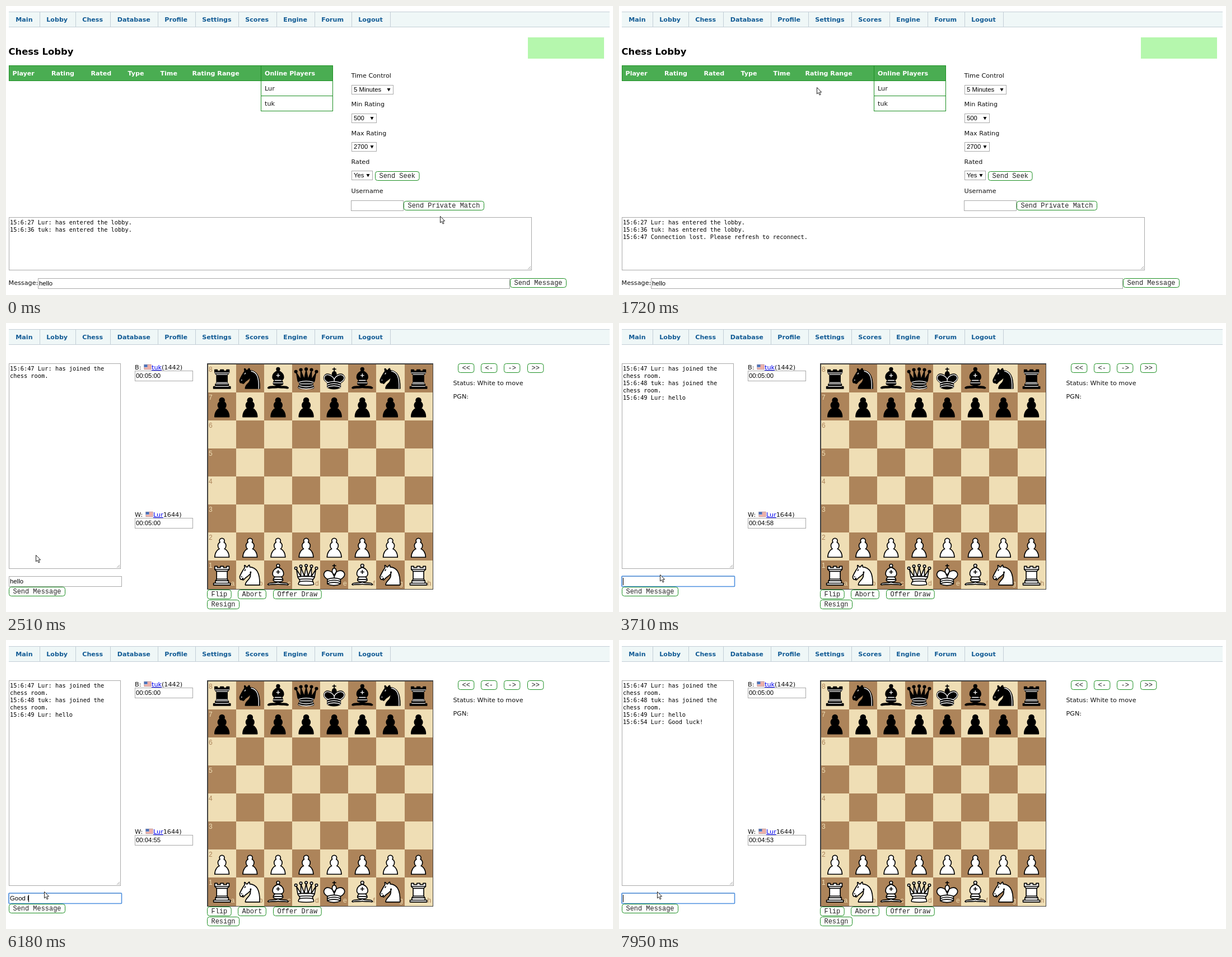
Recreate the animation shown at these times as an HTML page with a canvas. Size 1084 by 516 pixels, loop 8000 ms.

```html
<!DOCTYPE html>
<html lang="en">
<head>
<meta charset="utf-8">
<title>Chess Lobby</title>
<style>
html, body { margin: 0; width: 100%; height: 100%; overflow: hidden; background: #fff; }
canvas { display: block; }
</style>
</head>
<body>
<canvas id="stage" width="1084" height="516"></canvas>
<script>
const ctx = document.getElementById('stage').getContext('2d');
const LOOP = 8000;
const UI = '11.2px "DejaVu Sans", sans-serif';
const BOLD = 'bold 11.1px "DejaVu Sans", sans-serif';
const TITLE = 'bold 16.4px "DejaVu Sans", sans-serif';
const FIELD = '11.35px "Liberation Sans", sans-serif';
const COORD = '12px "Liberation Sans", sans-serif';
const CHAT = '10.35px "DejaVu Sans Mono", monospace';
const BUTTON = '11.95px "Liberation Mono", monospace';
const LIGHT = '#efdeb5', DARK = '#ad845a', GREEN = '#1c8f22';
const HOST = 'Lur', GUEST = 'tuk';

// ---- timeline: each entry is [time, value]
const CHESS_PAGE = 1780, GAME_DATA = 2010, FOCUS = 2990;
const typed = [[0, 'hello'], [3710, ''], [5150, 'G'], [5280, 'Go'], [5410, 'Goo'], [5540, 'Good'],
  [5990, 'Good '], [6180, 'Good l'], [6310, 'Good lu'], [6370, 'Good luc'], [6430, 'Good luck'],
  [7220, 'Good luck!'], [7950, '']];
const clockTicks = [3770, 4750, 5730, 6760, 7750];
const lobbyChat = [[0, `15:6:27 ${HOST}: has entered the lobby.`], [0, `15:6:36 ${GUEST}: has entered the lobby.`],
  [1720, '15:6:47 Connection lost. Please refresh to reconnect.']];
const gameChat = [[GAME_DATA, `15:6:47 ${HOST}: has joined the`], [GAME_DATA, 'chess room.'],
  [2630, `15:6:48 ${GUEST}: has joined the`], [2630, 'chess room.'],
  [3710, `15:6:49 ${HOST}: hello`], [7950, `15:6:54 ${HOST}: Good luck!`]];
const pointer = [[0, 775, 375], [399, 775, 375], [400, 772, 372], [740, 772, 372], [1260, 358, 116],
  [1460, 353, 144], [1780, 353, 145], [1900, 353, 145], [2510, 53, 414], [2870, 64, 460],
  [3130, 64, 460], [3250, 73, 449], [3830, 73, 449], [3960, 68, 449], [LOOP, 68, 449]];

const current = (list, t) => list.filter(e => e[0] <= t).pop();

function pointerAt(t) {
  const i = pointer.findIndex(p => p[0] > t), [t0, x0, y0] = pointer[i - 1], [t1, x1, y1] = pointer[i];
  const k = (t - t0) / (t1 - t0), e = k * k * (3 - 2 * k);
  return [x0 + (x1 - x0) * e, y0 + (y1 - y0) * e];
}

// ---- drawing helpers
function text(str, x, y, font = UI, color = '#111', align = 'left') {
  ctx.font = font;
  ctx.fillStyle = color;
  ctx.textAlign = align;
  ctx.fillText(str, x, y);
  return x + ctx.measureText(str).width;
}

function fill(x, y, w, h, color) {
  ctx.fillStyle = color;
  ctx.fillRect(x, y, w, h);
}

function frame(x, y, w, h, color = '#a9a9a9', width = 1) {
  ctx.strokeStyle = color;
  ctx.lineWidth = width;
  ctx.strokeRect(x + .5, y + .5, w - 1, h - 1);
}

function button(x, y, label) {
  ctx.beginPath();
  ctx.roundRect(x + .5, y + .5, label.length * 7.17 + 14, 16, 4);
  ctx.strokeStyle = GREEN;
  ctx.lineWidth = 1;
  ctx.stroke();
  text(label, x + 7.5, y + 12, BUTTON, '#222');
}

function field(x, y, w, value = '') {
  frame(x, y, w, 19);
  text(value, x + 2, y + 13, FIELD, '#000');
}

function select(x, y, w, value) {
  frame(x, y, w, 17);
  text(value, x + 4, y + 12.3, FIELD, '#000');
  ctx.fillStyle = '#000';
  ctx.fill(new Path2D(`M${x + w - 11.5} ${y + 6}h6l-3 5.5z`));
}

function chatBox(x, y, w, h, lines, t) {
  frame(x, y, w, h);
  lines.filter(l => l[0] <= t).forEach((l, i) => text(l[1], x + 2, y + 13 + i * 13, CHAT, '#000'));
  ctx.strokeStyle = '#888';
  ctx.lineWidth = .8;
  ctx.stroke(new Path2D(`M${x + w - 7} ${y + h - 2}l5-5m-2 5l2-2`));
}

function nav(y) {
  fill(5, y, 1073, 28, '#eff7f7');
  fill(5, y, 1073, 1, '#c3ced6');
  fill(5, y + 27, 1073, 1, '#c3ced6');
  const items = { Main: 18, Lobby: 73, Chess: 137, Database: 199.5, Profile: 284, Settings: 351,
    Scores: 428, Engine: 496, Forum: 564, Logout: 630 };
  for (const [name, x] of Object.entries(items)) text(name, x - .7, y + 18, BOLD, '#105a94');
  for (const x of [60, 124, 186, 271, 338, 415, 483, 551, 617, 686]) fill(x, y + 1, 1, 26, '#c3ced6');
}

// ---- lobby
function lobby(t) {
  nav(10);
  text('Chess Lobby', 4.5, 87, TITLE, '#000');
  fill(932, 56, 136, 38, '#b5f7ad');

  fill(5, 106, 579, 28, '#4aad52');
  frame(5, 106, 579, 28, GREEN);
  const columns = [12, 81.5, 152, 218, 276, 333, 462.5];
  ['Player', 'Rating', 'Rated', 'Type', 'Time', 'Rating Range', 'Online Players']
    .forEach((name, i) => text(name, columns[i] - .5, 124, BOLD, '#fff'));
  frame(455, 106, 129, 28, GREEN);
  [HOST, GUEST].forEach((name, i) => {
    frame(455, 133 + 27 * i, 129, 28, GREEN);
    text(name, 462, 151 + 27 * i);
  });
  if (t >= 1130 && t < 1660) {
    frame(5, 133, 451, 28, GREEN);
    [GUEST, '1442', 'Yes', 'blitz', '5', '500-2700'].forEach((v, i) => text(v, columns[i], 151));
  }

  ['Time Control', 'Min Rating', 'Max Rating', 'Rated', 'Username']
    .forEach((label, i) => text(label, 616.5, 128 + 51.4 * i));
  select(617, 141, 75, '5 Minutes');
  select(617, 192, 45, '500');
  select(617, 243, 45, '2700');
  select(617, 294, 38, 'Yes');
  button(659, 295, 'Send Seek');
  field(616, 347, 94);
  button(710, 348, 'Send Private Match');

  chatBox(5, 377, 934, 95, lobbyChat, t);
  text('Message:', 4.5, 498);
  field(57, 486, 843, 'hello');
  button(900, 486, 'Send Message');
}

// ---- chess pieces: shapes in a 45 x 45 cell; "lines" are thin inner strokes
const circle = (x, y, r) => `M${x - r} ${y}a${r} ${r} 0 1 1 ${2 * r} 0a${r} ${r} 0 1 1 ${-2 * r} 0z`;
const crown = r => [[6, 12], [14, 9], [22.5, 8], [31, 9], [39, 12]].map(([x, y]) => circle(x, y, r)).join('');
const pieces = {
  P: { body: 'M22.5 9c-2.21 0-4 1.79-4 4 0 .89.29 1.71.78 2.38C17.33 16.5 16 18.59 16 21c0 2.03.94 3.84 2.41 5.03-3 1.06-7.41 5.55-7.41 13.47h23c0-7.92-4.41-12.41-7.41-13.47 1.47-1.19 2.41-3 2.41-5.03 0-2.41-1.33-4.5-3.28-5.62.49-.67.78-1.49.78-2.38 0-2.21-1.79-4-4-4z', lines: '' },
  R: { body: 'M9 39h27v-3H9zM12 36v-4h21v4zM12.5 32l1.5-2.5h17l1.5 2.5zM14 29.5V17h17v12.5zM14 17l-3-3V9h4v2h5V9h5v2h5V9h4v5l-3 3z',
    lines: 'M11 14h23', darkLines: 'M12 35.5h21M13 31.5h19M14 29.5h17M14 16.5h17M11 14h23' },
  N: { body: 'M22 10c10.5 1 16.5 8 16 29H15c0-9 10-6.5 8-21M24 18c.38 2.91-5.55 7.37-8 9-3 2-2.82 4.34-5 4-1.04-.94 1.41-3.04 0-3-1 0 .19 1.23-1 2-1 0-4 1-4-4 0-2 6-12 6-12s1.89-1.9 2-3.5c-.73-1-.5-2-.5-3 1-1 3 2.5 3 2.5h2s.78-2 2.5-3c1 0 1 3 1 3',
    lines: circle(9, 25.5, .3) + 'M15 14.3l-.9 1.5', darkLines: circle(9, 25.5, .3) + 'M15 14.3l-.9 1.5M24.5 11.2c9 1.5 12.5 10 11.8 28' },
  B: { body: 'M9 36c3.39-.97 10.11.43 13.5-2 3.39 2.43 10.11 1.03 13.5 2 0 0 1.65.54 3 2-.68.97-1.65.99-3 .5-3.39-.97-10.11.46-13.5-1-3.39 1.46-10.11.03-13.5 1-1.35.49-2.32.47-3-.5 1.35-1.94 3-2 3-2zM15 32c2.5 2.5 12.5 2.5 15 0 .5-1.5 0-2 0-2 0-2.5-2.5-4-2.5-4 5.5-1.5 6-11.5-5-15.5-11 4-10.5 14-5 15.5 0 0-2.5 1.5-2.5 4 0 0-.5.5 0 2z' + circle(22.5, 8, 2.5),
    lines: 'M17.5 26h10M15 30h15M22.5 15.5v5M20 18h5' },
  Q: { body: 'M9 26c8.5-1.5 21-1.5 27 0l2-12-7 11V11l-5.5 13.5-3-15-3 15-5.5-14V25L7 14zM9 26c0 2 1.5 2 2.5 4 1 1.5 1 1 .5 3.5-1.5 1-1.5 2.5-1.5 2.5-1.5 1.5.5 2.5.5 2.5 6.5 1 16.5 1 23 0 0 0 1.5-1 0-2.5 0 0 .5-1.5-1-2.5-.5-2.5-.5-2 .5-3.5 1-2 2.5-2 2.5-4-8.5-1.5-18.5-1.5-27 0z' + crown(2),
    lines: 'M11.5 30c3.5-1 18.5-1 22 0M12 33.5c6-1 15-1 21 0', darkLines: 'M11 29a35 35 0 0 1 23 0M12.5 31.5h20M11.5 34.5a35 35 0 0 0 22 0M10.5 37.5a35 35 0 0 0 24 0' },
  K: { body: 'M22.5 11.63V6M20 8h5M22.5 25s4.5-7.5 3-10.5c0 0-1-2.5-3-2.5s-3 2.5-3 2.5c-1.5 3 3 10.5 3 10.5M11.5 37c5.5 3.5 15.5 3.5 21 0v-7s9-4.5 6-10.5c-4-6.5-13.5-3.5-16 4V27v-3.5c-3.5-7.5-13-10.5-16-4-3 6 5 10 5 10z',
    lines: 'M11.5 30c5.5-3 15.5-3 21 0M11.5 33.5c5.5-3 15.5-3 21 0M11.5 37c5.5-3 15.5-3 21 0',
    darkLines: 'M32 29.5s8.5-4 6.03-9.65C34.15 14 25 18 22.5 24.5v2.1-2.1C20 18 9.9 14 7 19.85c-2.5 5.65 4.85 9 4.85 9M11.5 30c5.5-3 15.5-3 21 0M11.5 33.5c5.5-3 15.5-3 21 0M11.5 37c5.5-3 15.5-3 21 0' }
};

function piece(kind, x, y, size, black) {
  const { body, lines, darkLines = lines } = pieces[kind], shape = new Path2D(body);
  ctx.save();
  ctx.translate(x, y);
  ctx.scale(size / 45, size / 45);
  ctx.lineJoin = ctx.lineCap = 'round';
  ctx.lineWidth = 1.5;
  ctx.fillStyle = black ? '#000' : '#fff';
  ctx.strokeStyle = '#000';
  ctx.fill(shape);
  ctx.stroke(shape);
  if (black) {
    ctx.strokeStyle = '#fff';
    ctx.lineWidth = 1.2;
  }
  ctx.stroke(new Path2D(black ? darkLines : lines));
  ctx.restore();
}

function board() {
  const left = 360.6, top = 73.5, size = 50.13;
  fill(359, 72, 404, 404, '#404040');
  for (let row = 0; row < 8; row++) {
    for (let col = 0; col < 8; col++) {
      const x = Math.round(left + col * size), y = Math.round(top + row * size);
      const odd = (row + col) % 2, ink = odd ? LIGHT : DARK;
      fill(x, y, Math.round(left + (col + 1) * size) - x, Math.round(top + (row + 1) * size) - y, odd ? DARK : LIGHT);
      if (col === 0) text(8 - row, x + 1, y + 12.7, COORD, ink);
      if (row === 7) text('abcdefgh'[col], left + (col + 1) * size - 2.5, 469, COORD, ink, 'right');
      const kind = row === 0 || row === 7 ? 'RNBQKBNR'[col] : row === 1 || row === 6 ? 'P' : '';
      if (kind) piece(kind, left + col * size, top + row * size, size, row < 2);
    }
  }
}

// ---- game page
function flag(x, y) {
  fill(x, y, 13, 9, '#fff');
  for (let i = 0; i < 5; i++) fill(x, y + i * 2, 13, 1, '#e0604f');
  fill(x, y, 6, 5, '#4a73bd');
  frame(x, y, 13, 9, 'rgba(120,120,140,.4)');
}

function playerLabel(side, name, rating, flagX, y) {
  text(side, 230, y);
  flag(flagX, y - 9);
  const end = text(name, flagX + 13.5, y, UI, '#0000ee');
  fill(flagX + 13.5, y + 1, end - flagX - 13.5, 1, '#0000ee');
  text(rating, end, y);
}

function messageField(t) {
  const [keyTime, value] = current(typed, t);
  field(5, 452, 202, value);
  if (t < FOCUS) return;
  ctx.beginPath();
  ctx.roundRect(5, 452, 201.5, 18.5, 1);
  ctx.strokeStyle = '#4d90e0';
  ctx.lineWidth = 1.6;
  ctx.stroke();
  const blink = Math.floor((t - Math.max(keyTime, FOCUS)) / 510) % 2;
  ctx.font = FIELD;
  if (!blink) fill(Math.round(7 + ctx.measureText(value).width - .3), 455, 1, 13, '#000');
}

function game(t) {
  nav(11);
  const ready = t >= GAME_DATA;
  chatBox(5, 72, 200, 367, gameChat, t);
  messageField(t);
  button(5, 471, 'Send Message');

  if (ready) {
    playerLabel('B:', GUEST, '(1442)', 246.5, 83);
    playerLabel('W:', HOST, '1644)', 249.5, 346);
  } else {
    text('Black:', 230, 83);
    text('White:', 230, 346);
  }
  const seconds = 58 - clockTicks.filter(tick => tick <= t).length;
  field(230, 85, 104, ready ? '00:05:00' : '10:00');
  field(230, 348, 104, !ready ? '10:00' : t < 2750 ? '00:05:00' : '00:04:' + seconds);
  if (!ready) button(230, 394, 'Rematch');

  board();
  button(359, 476, 'Flip');
  button(414, 476, 'Abort');
  button(477, 476, 'Offer Draw');
  button(359, 494, 'Resign');
  ['<<', '<-', '->', '>>'].forEach((label, i) => button(807 + Math.round(41.2 * i), 72, label));
  if (!ready) button(971, 72, 'Export PGN');
  text('Status: White to move', 798.5, 111);
  text('PGN:', 798.5, 135);
}

function drawPointer(t) {
  const [x, y] = pointerAt(t).map(Math.round);
  const overField = t >= CHESS_PAGE && x < 207 && y > 451;
  const shape = new Path2D(overField
    ? 'M-2.5-7.5h2l.5.5.5-.5h2M0-7V7M-2.5 7.5h2l.5-.5.5.5h2'
    : 'M0 0v11.5l2.7-2.4 2 4.4 1.9-.9-2-4.2h3.6z');
  ctx.save();
  ctx.translate(x + .5, y + .5);
  ctx.lineWidth = 1;
  ctx.fillStyle = '#fff';
  ctx.strokeStyle = '#222';
  if (!overField) ctx.fill(shape);
  ctx.stroke(shape);
  ctx.restore();
}

function render(now) {
  const t = now % LOOP;
  fill(0, 0, 1084, 516, '#fff');
  (t < CHESS_PAGE ? lobby : game)(t);
  drawPointer(t);
  requestAnimationFrame(render);
}

const start = performance.now();
requestAnimationFrame(function first() { render(0); });
const baseRender = render;
render = now => baseRender(Math.max(0, now - start));
</script>
</body>
</html>
```
